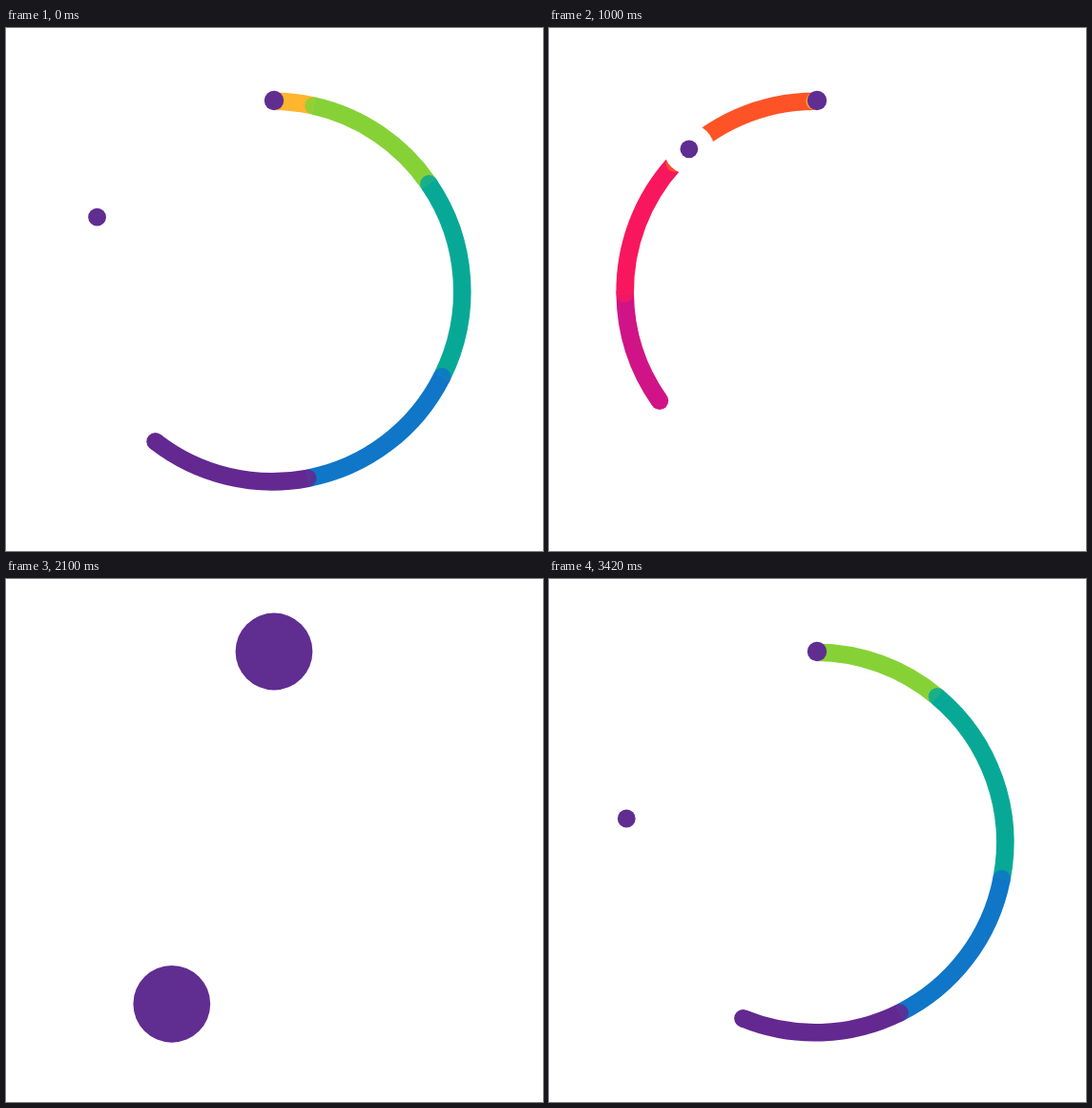
An HTML page with a canvas that plays this animation: 563 px wide and 548 px high, repeating every 3.46 s.

```html
<!DOCTYPE html>
<html lang="en">
<head>
<meta charset="utf-8">
<title>Colour ring loader</title>
<style>
  html, body { margin: 0; width: 100%; height: 100%; overflow: hidden; background: #fff; }
  canvas { display: block; }
</style>
</head>
<body>
<canvas id="stage" width="563" height="548"></canvas>
<script>
const ctx = document.getElementById('stage').getContext('2d');

const LOOP = 3460, STEP = 40, STEPS = 84;
const HOLD_STEP = 41, HOLD_END = 1780;     // one step lingers until HOLD_END
const CX = 279, CY = 276, RADIUS = 199.3, WIDTH = 18.6;
const PURPLE = '#602d91';

// Ribbon colours from head to tail, each with its length in degrees.
const RIBBON = [
  ['#642891', 48.7], ['#0f76c8', 52.6], ['#07a996', 61], ['#86d236', 43],
  ['#ffb52c', 43.2], ['#fd5326', 47.5], ['#f8175e', 43], ['#d01487', 34.5]
];
const RIBBON_SPEED = 15.62;

// Orbit of the moving dot: [steps since launch, degrees clockwise from the top].
const ORBIT = [
  [0, 0], [5.5, 138.5], [13.5, 277.2], [14.5, 293], [32.5, 582.1], [48.5, 786.8],
  [56.5, 860.4], [69.5, 975], [73.5, 1007.4], [84, 1080]
];
const secants = ORBIT.slice(1).map(([x, y], i) => (y - ORBIT[i][1]) / (x - ORBIT[i][0]));
const slopes = ORBIT.map((_, i) => {
  if (i === 0) return secants[0] * 1.15;
  if (i === secants.length) return secants[i - 1];
  const a = secants[i - 1], b = secants[i];
  return 2 * a * b / (a + b);
});

function orbitAngle(n) {
  let i = 0;
  while (i < secants.length - 1 && n > ORBIT[i + 1][0]) i++;
  const [x0, y0] = ORBIT[i], [x1, y1] = ORBIT[i + 1];
  const h = x1 - x0, u = (n - x0) / h, v = 1 - u;
  return y0 * v * v * (1 + 2 * u) + y1 * u * u * (3 - 2 * u)
    + h * u * v * (slopes[i] * v - slopes[i + 1] * u);
}

const wrap = k => (k + STEPS) % STEPS;
const ramp = (x, a, b) => Math.min(1, Math.max(0, (x - a) / (b - a)));
const mix = (a, b, u) => a + (b - a) * u;
const rad = deg => (deg - 90) * Math.PI / 180;

function disc(x, y, r, color) {
  ctx.fillStyle = color;
  ctx.beginPath();
  ctx.arc(x, y, r, 0, Math.PI * 2);
  ctx.fill();
}

function ringDisc(deg, r, color) {
  disc(CX + RADIUS * Math.cos(rad(deg)), CY + RADIUS * Math.sin(rad(deg)), r, color);
}

function drawRibbon(head) {
  let end = head - RIBBON.reduce((sum, part) => sum + part[1], 0);
  ctx.lineWidth = WIDTH;
  for (let i = RIBBON.length - 1; i >= 0; i--) {
    const [color, length] = RIBBON[i];
    const start = end;
    end += length;
    const a = Math.max(0, start), b = Math.min(360, end);
    if (a >= b) continue;
    ctx.strokeStyle = color;
    ctx.beginPath();
    ctx.arc(CX, CY, RADIUS, rad(a), rad(b));
    ctx.stroke();
    if (start > 0) {
      // Joints let a little of the next colour through.
      ctx.globalAlpha = i === RIBBON.length - 1 ? 1 : 0.85;
      ringDisc(start, WIDTH / 2, color);
      ctx.globalAlpha = 1;
    }
    if (i === 0 && end < 360) ringDisc(end, WIDTH / 2, color);
  }
}

function stepAt(t) {
  if (t < HOLD_END) return Math.min(HOLD_STEP, Math.floor(t / STEP));
  return HOLD_STEP + 1 + Math.floor((t - HOLD_END) / STEP);
}

function draw() {
  const k = stepAt(performance.now() % LOOP);
  const n = wrap(k - 69.5);
  const angle = orbitAngle(n);
  const dotR = mix(9.4, 40.4, ramp(n, 42.6, 55.5));
  const hubR = n < 30
    ? mix(40.4, 10.2, ramp(n, 0, 9.25))
    : mix(10.2, 40.4, ramp(n, 41.1, 55.5));

  ctx.fillStyle = '#fff';
  ctx.fillRect(0, 0, 563, 548);
  drawRibbon(wrap(k - 70.05) * RIBBON_SPEED);
  ringDisc(angle, dotR + 17, '#fff');
  ringDisc(angle, dotR, PURPLE);
  disc(281, 76, hubR, PURPLE);
  requestAnimationFrame(draw);
}
draw();
</script>
</body>
</html>
```
